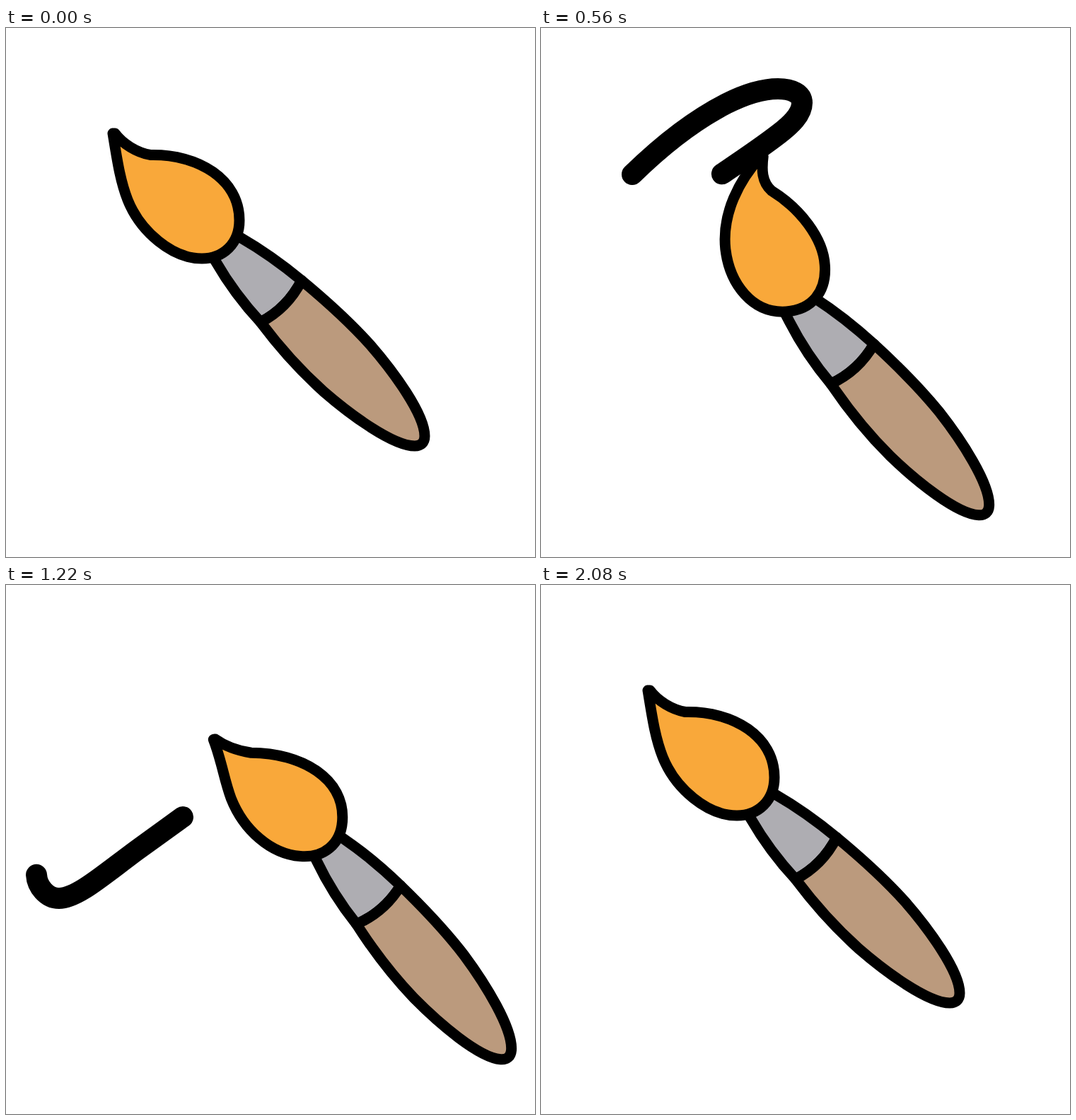
Recreate the animation shown at these times as an HTML page. Size 748 by 748 pixels, loop 2.42 s.

```html
<!DOCTYPE html>
<html lang="en">
<head>
<meta charset="utf-8">
<title>Paintbrush</title>
<style>
  html, body { margin: 0; width: 100%; height: 100%; overflow: hidden; background: #fff; }
  svg { display: block; width: 100%; height: 100%; }
  path { stroke: #000; stroke-width: 15; stroke-linecap: round; stroke-linejoin: round; }
  #trail { fill: none; stroke-width: 30; }
  #ferrule { fill: #aeadb2; }
  #handle { fill: #bb9a7d; }
  #bristles { fill: #f9a83a; }
</style>
</head>
<body>
<svg viewBox="0 0 748 748">
  <path id="trail" d="M129 207C174 163 221 128 262 107C288 94 314 86 335 86C355 86 369 93 369 106
    C369 122 353 137 336 150C297 180 255 206 214 235C170 266 43 350 43 408
    C43 425 57 443 75 443C100 443 135 412 185 375L250 328"/>
  <g id="brush">
    <path id="ferrule" d="M313 286L331 296C357 311 389 333 418 357Q398 396 360 416C334 388 312 357 297 331L287 314Z"/>
    <path id="handle" d="M418 357C453 386 488 418 515 448C548 486 592 546 592 577C592 586 587 591 578 591
      C547 591 487 547 449 514C419 487 387 452 360 416Q398 396 418 357Z"/>
    <path id="bristles"/>
  </g>
</svg>
<script>
const LOOP = 2420;
const REST = { x: 389, y: 385, r: 0, bend: 0 };

// Brush pose over time: ferrule centre, rotation in degrees, bristle bend
const keys = [
  [0, 389, 385, 0, 0],
  [220, 492, 348, 1.8, 0.03],
  [380, 529, 318, 7.5, 0.35],
  [560, 441, 473, 2.9, 0.85],
  [720, 340, 525, -4, 0.18],
  [840, 330, 543, -8, -0.55],
  [1040, 478.5, 502, 0.4, -1],
  [1200, 527, 455, 4, -0.45],
  [1440, 485.5, 419.5, 7.7, 1],
  [1620, 413, 404, 3, 0.95],
  [1800, 393, 388, 0.5, 0.4],
  [2080, 389, 385, 0, 0]
];

const trail = document.getElementById("trail");
const brush = document.getElementById("brush");
const bristles = document.getElementById("bristles");
const trailLength = trail.getTotalLength();

// Parses an outline drawn in a given pose and moves it back to the rest pose
function outline(text, x, y, degrees) {
  const n = text.split(/[ ,]+/).map(Number);
  const a = -degrees * Math.PI / 180, c = Math.cos(a), s = Math.sin(a);
  const out = [];
  for (let i = 0; i < n.length; i += 2) {
    const dx = n[i] - x, dy = n[i + 1] - y;
    out.push(REST.x + dx * c - dy * s, REST.y + dx * s + dy * c);
  }
  return out;
}

const straight = outline(
  "154,149 165,164 185,176 204,179.5 272,178 330,214 330,272 330,305 307,326 277,326 " +
  "235,326 190,288 172,243 161,215 157,185 151,149", REST.x, REST.y, 0);
const right = outline(
  "402,111.5 396,130 391,148 403,163 436,195 461,240 461,275 461,314 438,338 401,338 " +
  "352,338 325.5,293 325.5,243 325.5,188 360,140 399,111", 485.5, 419.5, 7.7);
const left = outline(
  "206,328 224,323 243,316 262,314 340,302 417,325 417,391 417,422 396,443.5 357,443.5 " +
  "315,443.5 282,426 255,386 242,366 232,342 204,330", 478.5, 502, 0.4);

function slope(i, k) {
  if (i === 0 || i === keys.length - 1) return 0;
  const a = keys[i - 1], b = keys[i + 1];
  return (b[k] - a[k]) / (b[0] - a[0]);
}

// Smooth curve through the keys, at rest at both ends
function poseAt(t) {
  if (t >= keys[keys.length - 1][0]) return REST;
  const i = keys.findIndex(key => key[0] > t) - 1;
  const a = keys[i], b = keys[i + 1];
  const span = b[0] - a[0], u = (t - a[0]) / span, v = 1 - u;
  const [x, y, r, bend] = [1, 2, 3, 4].map(k =>
    a[k] * (1 + 2 * u) * v * v + b[k] * u * u * (3 - 2 * u) +
    span * (slope(i, k) * u * v * v - slope(i + 1, k) * u * u * v));
  return { x, y, r, bend };
}

function bristlePath(bend) {
  const side = bend < 0 ? left : right, amount = Math.abs(bend);
  const p = straight.map((n, i) => (n + (side[i] - n) * amount).toFixed(2));
  return `M${p.slice(0, 2)}C${p.slice(2)}Z`;
}

function drawTrail(t) {
  const head = Math.min(trailLength, 1.05 * (t - 140));
  const u = Math.min(1, Math.max(0, (t - 840) / 578));
  const tail = trailLength * (1 - Math.cos(Math.PI * u)) / 2;
  const shown = head - tail;
  trail.style.visibility = shown > 0 ? "visible" : "hidden";
  if (shown <= 0) return;
  trail.setAttribute("stroke-dasharray", `${shown} ${trailLength * 2}`);
  trail.setAttribute("stroke-dashoffset", -tail);
}

function draw(t) {
  const pose = poseAt(t);
  brush.setAttribute("transform",
    `translate(${pose.x} ${pose.y}) rotate(${pose.r}) translate(${-REST.x} ${-REST.y})`);
  bristles.setAttribute("d", bristlePath(pose.bend));
  drawTrail(t);
}

const start = performance.now();
function tick() {
  draw((performance.now() - start) % LOOP);
  requestAnimationFrame(tick);
}
tick();
</script>
</body>
</html>
```
